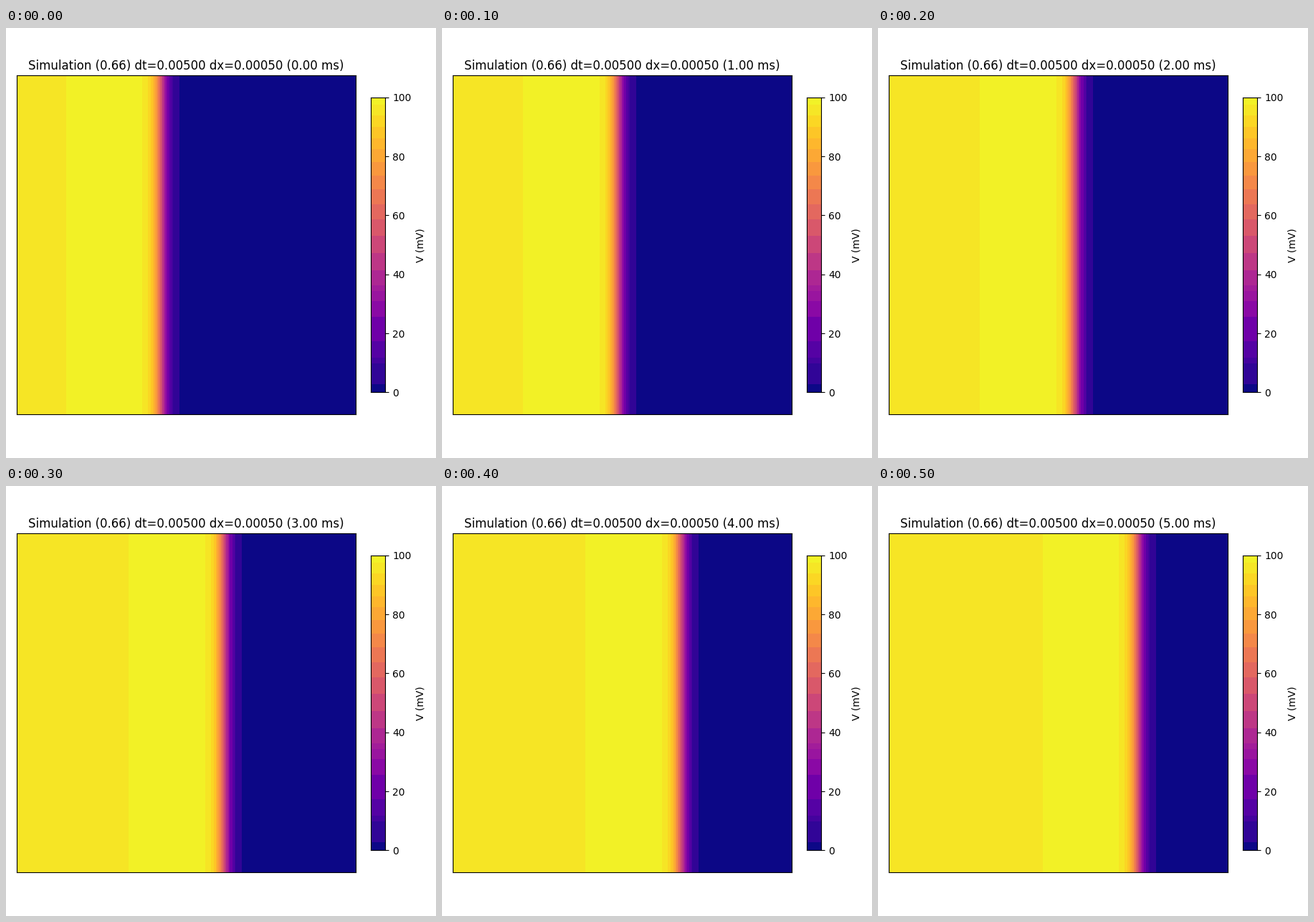
A matplotlib script for the animation above (600 ms loop, 600 by 600 pixels).

```python
import numpy as np
import matplotlib.pyplot as plt
from matplotlib.animation import FuncAnimation
from matplotlib.colors import BoundaryNorm, ListedColormap

SIZE = 600
FRAMES = 6
LEFT, TOP, SIDE = 15, 66.15, 473
SHRINK = 0.87
FRONT_X, SPEED = 217.5, 29.2

plt.rcParams["font.family"] = "DejaVu Sans"
fig = plt.figure(figsize=(6, 6), dpi=100, facecolor="white")


def pixel_axes(left, top, width, height):
    return fig.add_axes([left / SIZE, 1 - (top + height) / SIZE,
                         width / SIZE, height / SIZE])


# Coarse plasma bands, in mV
edges = np.array([0, 2.8, 9.8, 11.8, 17.3, 25.5, 30.9, 34.3, 36.3, 41.4, 47.2,
                  53.1, 58.7, 63.8, 68.9, 73.5, 78.1, 82.5, 86.1, 90.0,
                  93.9, 97.5, 100])
levels = (edges[:-1] + edges[1:]) / 200
levels[0], levels[-1] = 0, 0.982
bands = ListedColormap(plt.cm.plasma(levels))
norm = BoundaryNorm(edges, bands.N)

columns = LEFT + np.arange(SIDE) + 0.5


def voltage(step):
    """Steep wave front followed by a slow recovery."""
    u = columns - FRONT_X - SPEED * step
    rise = 1 / (1 + np.exp(u / 6.8))
    recovery = 1 - 0.045 * (1 - np.exp(np.minimum(u, 0) / 165))
    return 100 * (rise * recovery)[np.newaxis, :]


ax = pixel_axes(LEFT, TOP, SIDE, SIDE)
field = ax.imshow(voltage(0), cmap=bands, norm=norm, aspect="auto",
                  interpolation="nearest")
ax.set_xticks([])
ax.set_yticks([])
title = ax.set_title("", fontsize=12)

bar_height = SHRINK * SIDE
bar = pixel_axes(508.8, TOP + (SIDE - bar_height) / 2,
                 bar_height / 20, bar_height)
bar.pcolormesh([0, 1], edges, (edges[:-1] + edges[1:])[:, np.newaxis] / 2,
               cmap=bands, norm=norm)
bar.set_ylim(0, 100)
bar.set_xticks([])
bar.yaxis.tick_right()
bar.yaxis.set_label_position("right")
bar.set_yticks(range(0, 101, 20))
bar.set_ylabel("V (mV)", fontsize=10)


def update(step):
    field.set_data(voltage(step))
    title.set_text(f"Simulation (0.66) dt=0.00500 dx=0.00050 ({step:.2f} ms)")
    return field, title


anim = FuncAnimation(fig, update, frames=FRAMES, interval=100, repeat=True,
                     repeat_delay=0, blit=False)
plt.show()
```
